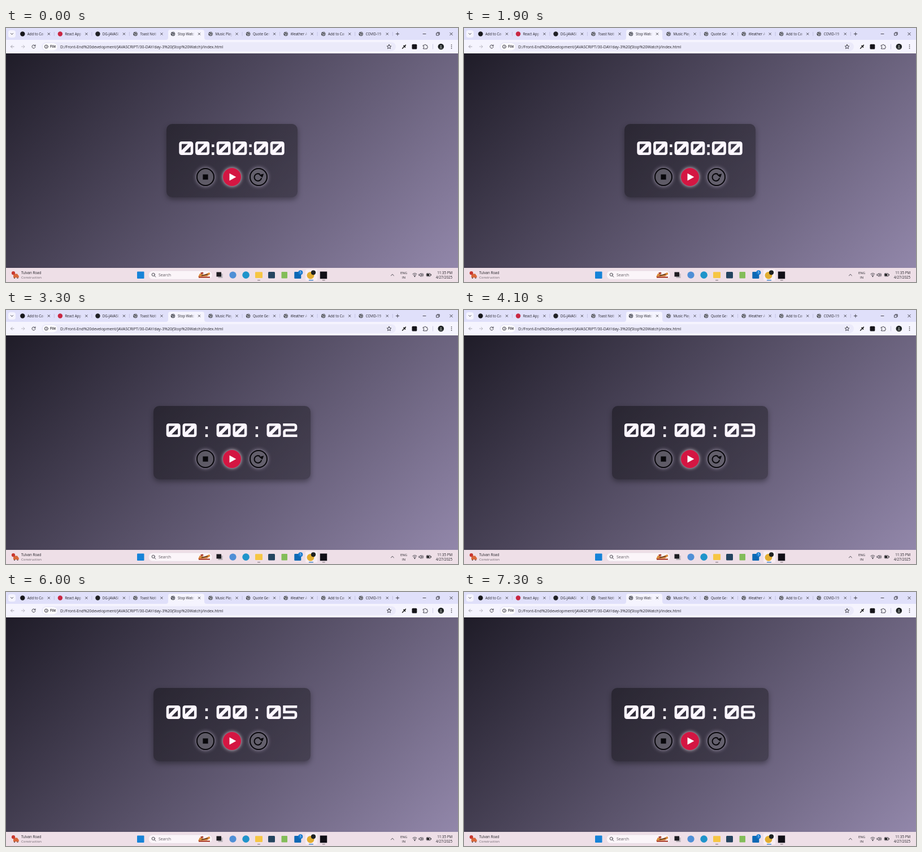
Animation, 800 px wide and 450 px high, one loop 8000 ms. Source, as an HTML page:

```html
<!DOCTYPE html>
<html lang="en">
<head>
<meta charset="utf-8">
<title>Stop Watch</title>
<style>
  html, body { margin: 0; width: 100%; height: 100%; overflow: hidden; }
  .stage { position: relative; width: 800px; height: 450px; overflow: hidden; background: #eedfe7; }
  .page {
    position: absolute; left: 0; top: 45px; width: 800px; height: 380px;
    background: linear-gradient(135deg, #1f1c28, #9287aa);
  }
  .card {
    position: absolute; top: 170px; height: 130px; border-radius: 10px;
    background: linear-gradient(110deg, rgba(0,0,0,.4), rgba(0,0,0,.35));
    box-shadow: 0 4px 10px rgba(0,0,0,.35);
  }
  .button { position: absolute; top: 248px; width: 32px; height: 32px; border-radius: 50%; box-sizing: border-box; }
  .dark { border: 2.6px solid #08070b; background: rgba(255,255,255,.2); box-shadow: 0 0 7px rgba(225,215,240,.7); }
  .play { left: 384px; background: #d41642; box-shadow: 0 0 6px rgba(250,232,242,.9); }
  svg { position: absolute; left: 0; top: 0; }
  text { font-family: "Open Sans", "Noto Sans", sans-serif; font-size: 6.2px; fill: #222027; }
  .line { fill: none; stroke: #33323a; stroke-width: .9; stroke-linecap: round; stroke-linejoin: round; }
  .glyph { fill: none; stroke: #fdf7ff; stroke-width: 4.6; }
  .solid { fill: #fdf7ff; stroke: none; }
</style>
</head>
<body>
<div class="stage">
  <div class="page"></div>
  <div class="card" id="card"></div>
  <div class="button dark" style="left:337px"></div>
  <div class="button play"></div>
  <div class="button dark" style="left:431px"></div>

  <svg width="800" height="450" viewBox="0 0 800 450">
    <defs>
      <linearGradient id="fade" x1="0" x2="1">
        <stop offset=".82" stop-color="#fff"/><stop offset="1" stop-color="#fff" stop-opacity="0"/>
      </linearGradient>
      <mask id="titleFade" maskUnits="userSpaceOnUse" x="0" y="0" width="30" height="21">
        <rect width="30" height="21" fill="url(#fade)"/>
      </mask>
      <g id="globe">
        <circle r="3.8" fill="#4b4d54"/>
        <path d="M-3 -1.2L-.6 -.1L-.4 1.5L-1.2 3M-.6 -3.2Q.2 -1 2.9 -1.5M.8 2.6Q1 .6 3 .7" fill="none" stroke="#eeeefb" stroke-width=".9"/>
      </g>
      <path id="cross" class="line" d="M-1.7 -1.7L1.7 1.7M1.7 -1.7L-1.7 1.7"/>
    </defs>

    <!-- Browser tabs -->
    <rect width="800" height="21" fill="#e0e0fa"/>
    <rect y="21" width="800" height="24" fill="#f5f4fe"/>
    <path d="M283 21q4 0 4-4V7q0-4 4-4h56q4 0 4 4v10q0 4 4 4z" fill="#f5f4fe"/>
    <rect x="4" y="4" width="13" height="13" rx="4" fill="#f5f4fe"/>
    <path class="line" d="M8.5 9.5l2 2l2 -2"/>
    <g id="tabs"></g>
    <path class="line" d="M690.3 10.5h5.4M693 7.8v5.4M738 10.5h5M785.7 8.2l4.6 4.6M790.3 8.2l-4.6 4.6"/>
    <path class="line" d="M762 9h4v4h-4zM763.2 7.8h4v4"/>

    <!-- Toolbar -->
    <rect x="63" y="25.3" width="627" height="15.6" rx="7.8" fill="#ebeafa"/>
    <rect x="65" y="27" width="25.5" height="12.4" rx="6.2" fill="#fdfcff"/>
    <path class="line" d="M14 33H8.6M11 30.5L8.5 33l2.5 2.5" style="stroke:#9b9aa5"/>
    <path class="line" d="M27.5 33h5.4M30.5 30.5l2.5 2.5l-2.5 2.5" style="stroke:#b4b3bd"/>
    <path class="line" d="M51.6 31.4A3 3 0 1 0 52 33.5M52 29.8v2h-2"/>
    <circle class="line" cx="71.3" cy="33" r="3"/>
    <path class="line" d="M71.3 32.8v1.5M71.3 31.4v.1"/>
    <text x="78" y="35.3" font-weight="600">File</text>
    <text x="96" y="35.6" style="font-size:7px">D:/Front-End%20development/JAVASCRIPT/30-DAY/day-3%20(Stop%20Watch)/index.html</text>
    <path class="line" d="M678 29.3l1.1 2.5l2.7 .3l-2 1.8l.6 2.7l-2.4 -1.4l-2.4 1.4l.6 -2.7l-2 -1.8l2.7 -.3z"/>
    <path d="M701.6 36.2l3.6 -3.7" stroke="#222" stroke-width="1.5" stroke-linecap="round"/>
    <path d="M704 31.4l2.5 2.5M705.5 32.2l1.8 -1.8" stroke="#111" stroke-width="1.6" stroke-linecap="round"/>
    <rect x="718.5" y="28.7" width="8.8" height="8.8" rx="1.5" fill="#16151a"/>
    <path class="line" d="M738.6 30.5h2a1.3 1.3 0 0 1 2.6 0h2v2a1.3 1.3 0 0 1 0 2.6v1.8h-6.6v-1.8a1.3 1.3 0 0 0 0 -2.6z"/>
    <path d="M755.5 28.5v9" stroke="#cfcde6"/>
    <circle cx="769.8" cy="33" r="5.3" fill="#1d2122"/>
    <circle cx="769.8" cy="32" r="1.6" fill="#868b88"/>
    <path d="M766.7 36.2q3.1 -4.4 6.2 0z" fill="#868b88"/>
    <g fill="#33323a"><circle cx="788.5" cy="30" r=".85"/><circle cx="788.5" cy="33" r=".85"/><circle cx="788.5" cy="36" r=".85"/></g>

    <!-- Stopwatch -->
    <g id="digits"></g>
    <rect x="348.4" y="259.4" width="9.2" height="9.2" fill="#08070b"/>
    <path d="M395.5 257.5v13l11.8 -6.5z" fill="#fff"/>
    <path d="M449.6 259.3A6.4 6.4 0 1 0 452.2 265.6" fill="none" stroke="#08070b" stroke-width="2.1"/>
    <path d="M447.8 260.2l8.4 -1.9l-2.4 6.6z" fill="#08070b"/>

    <!-- Taskbar -->
    <rect y="425" width="800" height="25" fill="#eedfe7"/>
    <path d="M13 438.2l1.4 -2.8h5.6l1.7 2.8l1 .8v3.3H13z" fill="#d9673a"/>
    <circle cx="13" cy="434.2" r="3.1" fill="#c9382f"/>
    <path d="M14 443h2M19.5 443h2" stroke="#55322c" stroke-width="1.3"/>
    <text x="27" y="435.6">Tulvan Road</text>
    <text x="27" y="443.8" style="font-size:6px;fill:#6b636b">Construction</text>
    <rect x="232" y="431.5" width="12.5" height="12.5" rx="1" fill="#1683d8"/>
    <rect x="252" y="430" width="113" height="15.4" rx="7.7" fill="#fbf5f9" stroke="#dfd0da" stroke-width=".6"/>
    <circle class="line" cx="260.8" cy="436.9" r="2.6"/><path class="line" d="M262.8 439l2 2.1"/>
    <text x="270" y="440.2" style="font-size:7px;fill:#5d575f">Search</text>
    <path d="M340 441l3 -6l8 2l9 -4l1.5 3l-6 4z" fill="#d98a3a"/>
    <path d="M341 440.5h20v2.3h-20zM344 433.5l4 -1l2 2l-4 2z" fill="#a93b2a"/>
    <path d="M346 438.8l11 -2.5" stroke="#563125" stroke-width="1.4"/>
    <rect x="375.5" y="435" width="8" height="8" fill="#b9b4ba"/>
    <rect x="372.5" y="432.5" width="8.5" height="8" fill="#1d1c21"/>
    <circle cx="401.5" cy="437.6" r="6.1" fill="#4f8fd6"/>
    <circle cx="424.6" cy="437.6" r="6.3" fill="#1f94cb"/>
    <rect x="441" y="432.3" width="13" height="10.7" rx="1" fill="#f6c644"/>
    <rect x="464" y="432" width="12" height="11.5" rx="1.5" fill="#24445f"/>
    <rect x="487.5" y="432" width="10.5" height="11.5" rx="1" fill="#83bd59"/>
    <rect x="510.3" y="432" width="12" height="12" rx="1" fill="#0c68b4"/>
    <circle cx="521.3" cy="433.3" r="4" fill="#1479cf"/>
    <text x="521.3" y="435.2" text-anchor="middle" style="font-size:5.4px;fill:#fff">5</text>
    <rect x="530" y="427.5" width="21" height="20" rx="2.5" fill="#f8eef3"/>
    <circle cx="539" cy="438.3" r="6.4" fill="#e2ae32"/>
    <circle cx="544" cy="433.3" r="4.1" fill="#1d2122"/>
    <rect x="555.8" y="431.5" width="12.4" height="12.8" fill="#100f16"/>
    <path d="M445.5 446.8h4M560.3 446.8h4" stroke="#8b8188" stroke-width="1.2" stroke-linecap="round"/>
    <path d="M536.5 446.8h7" stroke="#2677c5" stroke-width="1.3" stroke-linecap="round"/>
    <path class="line" d="M681.4 438.8l2.5 -2.5l2.5 2.5"/>
    <text x="704" y="435.8" text-anchor="middle" style="font-size:6px">ENG</text>
    <text x="704" y="443.9" text-anchor="middle" style="font-size:6px">IN</text>
    <path class="line" d="M719.8 436q3.6 -3.2 7.2 0M721.1 437.8q2.3 -2 4.6 0M722.4 439.5q1 -.8 2 0"/>
    <circle cx="723.4" cy="440.4" r=".8" fill="#33323a"/>
    <path class="line" d="M731.3 436.2h1.5l2.1 -1.8v6l-2.1 -1.8h-1.5zM736.3 436q1.2 1.4 0 2.8M737.6 434.7q2.3 2.7 0 5.4"/>
    <rect class="line" x="744.3" y="435" width="7" height="4.8" rx="1"/>
    <path d="M745 435.7h4.3v3.4H745zM751.8 436.3h1v2.2h-1z" fill="#222"/>
    <text x="790" y="435.6" text-anchor="end">11:35 PM</text>
    <text x="790" y="443.9" text-anchor="end">4/27/2025</text>
  </svg>
</div>

<script>
  const TAB_PITCH = 66.55;
  const tabs = ["Add to Cart", "React App", "DG-JAVASCRIPT", "Toast Notification", "Stop Watch",
    "Music Player", "Quote Generator", "Weather App", "Add to Cart", "COVID-19"];
  const iconColors = ["#17171b", "#c92743", "#202126"];

  document.getElementById("tabs").innerHTML = tabs.map((title, i) => {
    const icon = iconColors[i]
      ? `<circle cx="29.3" cy="10.5" r="4.2" fill="${iconColors[i]}"/>`
      : `<use href="#globe" x="29.3" y="10.5"/>`;
    const divider = i === 3 || i === 4 ? "" : `<path d="M85.3 7v7" stroke="#b6b5d8" stroke-width=".7"/>`;
    return `<g transform="translate(${i * TAB_PITCH} 0)">${icon}
      <g transform="translate(37.7 0)" mask="url(#titleFade)"><text y="12.8">${title}</text></g>
      <use href="#cross" x="75.8" y="10.5"/>${divider}</g>`;
  }).join("");

  // Each glyph: advance width, path, and whether it is filled.
  const glyphs = {
    "0": [28.8, "M5 0H20Q25 0 25 5V19Q25 24 20 24H5Q0 24 0 19V5Q0 0 5 0zM4.6 15.4L15.6 4.6H5.4Q4.6 4.6 4.6 5.4zM20.4 8.4L9.4 19.4H19.6Q20.4 19.4 20.4 18.6z", true],
    "1": [13.7, "M6.6 0H11.6V24H7V6.2L3 9.8L0 6.5z", true],
    "2": [28.8, "M0 2.3H19.7a3 3 0 0 1 3 3V9a3 3 0 0 1-3 3H5.3a3 3 0 0 0-3 3V21.7H25.2"],
    "3": [28.5, "M.3 2.3H19.5a3 3 0 0 1 3 3V18.7a3 3 0 0 1-3 3H0M4.5 12H21.5"],
    "4": [25.4, "M13 0H19V14.8H22.4V19.4H19V24H14.4V19.4H-.8V14.6zM14.4 5.6L5 14.8H14.4z", true],
    "5": [28.8, "M25 2.3H2.3V11.7h17.4a3 3 0 0 1 3 3v4a3 3 0 0 1-3 3H0"],
    "6": [28.8, "M23 2.3H5.3a3 3 0 0 0-3 3V18.7a3 3 0 0 0 3 3H19.7a3 3 0 0 0 3-3V14.7a3 3 0 0 0-3-3H2.3"],
    ":": [8.7, "M.2 5.2h4.4v4.8H.2zM.2 19.2h4.4V24H.2z", true],
    " ": [11.3, ""]
  };
  const LOOP = 8000, PADDING = 20.9, BEARING = 1.4;
  const ticks = [2000, 2800, 3800, 5000, 6000, 7000];
  const card = document.getElementById("card");
  const digits = document.getElementById("digits");
  let shown = -1;

  function showSeconds(seconds) {
    const label = seconds ? `00 : 00 : 0${seconds}` : "00:00:00";
    const width = 2 * PADDING + [...label].reduce((sum, c) => sum + glyphs[c][0], 0);
    const left = 400 - width / 2;
    card.style.left = left + "px";
    card.style.width = width + "px";
    let x = left + PADDING + BEARING;
    digits.innerHTML = [...label].map(c => {
      const [advance, path, solid] = glyphs[c];
      const mark = `<path class="${solid ? "solid" : "glyph"}" fill-rule="evenodd" transform="translate(${x} 201)" d="${path}"/>`;
      x += advance;
      return mark;
    }).join("");
    digits.setAttribute("aria-label", label);
  }

  function update() {
    const time = performance.now() % LOOP;
    const seconds = ticks.filter(tick => time >= tick).length;
    if (seconds !== shown) showSeconds(shown = seconds);
    requestAnimationFrame(update);
  }
  update();
</script>
</body>
</html>
```
